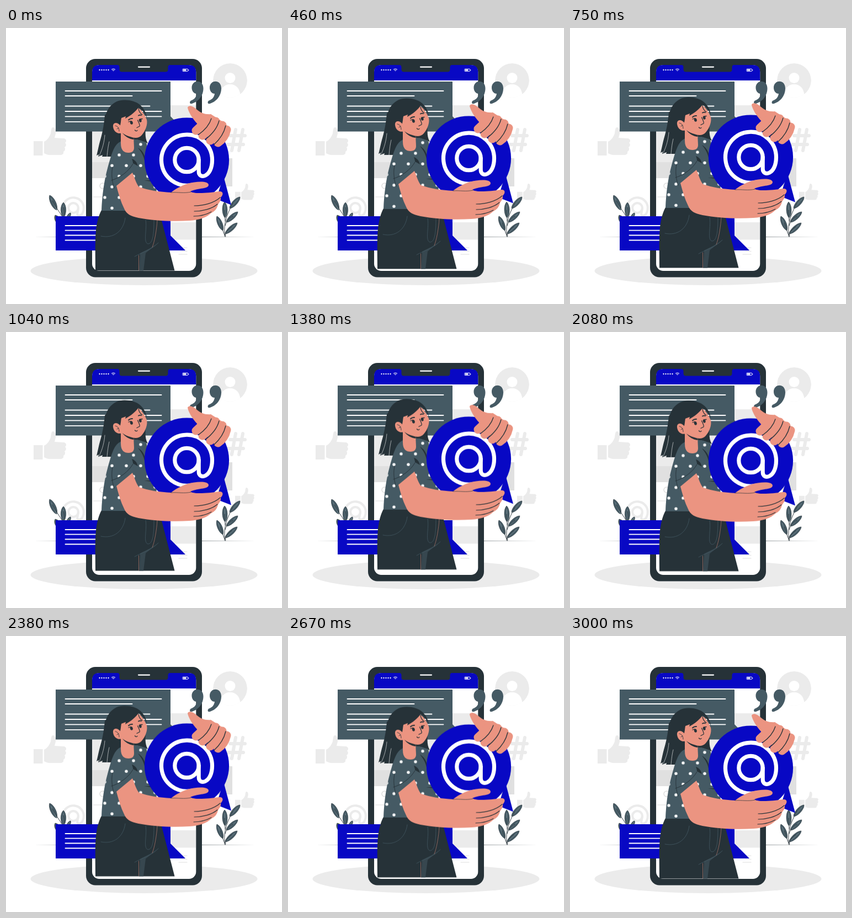
Recreate the animation shown at these times as an HTML page. Size 500 px wide and 500 px high, loop 3040 ms.

```html
<!DOCTYPE html>
<html lang="en">
<head>
<meta charset="utf-8">
<title>Mention</title>
<style>
  html, body { margin: 0; width: 100%; height: 100%; overflow: hidden; background: #fff; }
  svg { display: block; width: 100%; height: 100%; }
  .dark { fill: #263238; }
  .slate { fill: #455a64; }
  .blue { fill: #0808c4; }
  .pale { fill: #ebebeb; }
  .skin { fill: #eb9481; }
  .white { fill: #fff; }
  .line { fill: none; stroke-linecap: round; stroke-linejoin: round; }
  .ink { stroke: #263238; }
</style>
</head>
<body>
<svg viewBox="0 0 500 500">
  <defs>
    <pattern id="dots" x="198.5" y="220.4" width="26" height="38.5" patternUnits="userSpaceOnUse">
      <circle class="white" cx="6.5" cy="9.6" r="2.7"/>
      <circle class="white" cx="19.5" cy="28.9" r="2.7"/>
    </pattern>
    <clipPath id="avatar"><circle cx="406" cy="95" r="31"/></clipPath>
    <path id="quote" d="M347 96.800C353.500 96.800 357.500 102 357.500 109.500C357.500 123 348 134.500 335.500 137.300C332.500 137.300 332.300 133.300 335 131.500C341 129.500 344.500 125.500 345.500 119C340 119 336.500 114 336.500 108C336.500 101.500 341 96.800 347 96.800Z"/>
    <path id="thumb" d="M50 205H66.500V231H50ZM69 206C75 203 79 197 81 191C82 184 82 180 85 180C89 180 91 185 90 191L88 199L105 200C110 201 110 206 107 208C110 210 109 215 106 216C108 219 107 223 104 224C105 228 102 230 98 230H79C75 230 72 228 69 227Z"/>
    <g id="at" class="line">
      <circle r="21.700"/>
      <path d="M21.700 0V21C21.700 36 46 32 46 0A46 46 0 1 0 8 45.500"/>
    </g>
    <path id="shirt" d="M207 206C195 211 190 233 184 254C178 275 174 304 173 331H274L272 280L254 207L238 202Z"/>
  </defs>

  <!-- backdrop -->
  <ellipse class="pale" cx="250" cy="440" rx="205.500" ry="26"/>
  <path d="M50 378.500L250 378.100L452 378.500L250 378.900Z" class="dark"/>
  <g clip-path="url(#avatar)">
    <circle class="pale" cx="406" cy="95" r="31"/>
    <circle class="white" cx="406" cy="90.500" r="9.500"/>
    <path class="white" d="M387 128C387 110 395 102 406 102S425 110 425 128Z"/>
  </g>
  <use href="#thumb" class="pale"/>
  <use href="#thumb" class="pale" transform="translate(385.500 175.800) scale(.59)"/>
  <path class="line" stroke="#ebebeb" stroke-width="6" d="M416 184L409 222M429 184L422 222M406 195H433M402 211H430"/>
  <use href="#at" stroke="#ebebeb" stroke-width="10" transform="translate(122 326) rotate(10) scale(.41)"/>
  <path fill="#e0e0e0" d="M350 236H410V287H350Z"/>

  <!-- plants -->
  <g id="leaves"></g>
  <path class="line ink" stroke-width=".9" d="M84 313C90 325 97 333 104 345M104 325C106 334 105 339 104 345M397 378C394 362 396 344 411 318M396 330C396 340 397 346 397 350M388 353C391 362 394 370 397 378M411 341C403 346 399 351 397 358M409 360C402 365 398 370 397 377"/>

  <!-- phone -->
  <rect class="dark" x="145" y="56" width="210" height="395.500" rx="17"/>
  <rect class="white" x="156" y="67" width="188.300" height="373" rx="13"/>
  <path class="blue" d="M156 95V80Q156 67 169 67H331Q344.300 67 344.300 80V95Z"/>
  <path class="dark" d="M202 66.500Q205.500 67.500 205.500 71V75Q205.500 79.500 210 79.500H289Q293.500 79.500 293.500 75V71Q293.500 67.500 297 66.500Z"/>
  <path class="line" stroke="#fff" stroke-width="2.200" d="M240 70.600H260"/>
  <path class="line" stroke="#fff" stroke-width="2.300" d="M169.500 76h0M173.500 76h0M177.500 76h0M181.500 76h0M185.500 76h0"/>
  <path class="line" stroke="#fff" stroke-width="1" d="M191.300 75Q194.500 72.400 197.700 75M192.900 76.600Q194.500 75.300 196.100 76.600M194.500 78h0"/>
  <rect x="320" y="74" width="9.600" height="4.600" rx="1" fill="none" stroke="#fff" stroke-width=".9"/>
  <path class="white" d="M321 75H326.500V77.600H321ZM330.300 75.400H331.300V77.300H330.300Z"/>

  <!-- feed -->
  <path class="pale" d="M156 187H298V243H156ZM298 140H344V237H298ZM298 352H344V383.500H298Z"/>
  <path fill="#e0e0e0" d="M156 243H298V272H156Z"/>
  <path class="line" stroke="#e0e0e0" stroke-width="1.200" d="M313 398H328M318 404.500H328M313 410H328M158 306H178"/>
  <circle cx="175" cy="286" r="5" fill="none" stroke="#e0e0e0" stroke-width="1.600"/>

  <!-- messages -->
  <path class="slate" d="M90 97H298V160L325 187.500H90Z"/>
  <path class="line" stroke="#fff" stroke-width="1.800" d="M107.500 114H281.500M107.500 123H228.500M107.500 141.500H260.500M107.500 151H281.500M107.500 160.300H281.500M107.500 169.800H228.500"/>
  <path class="blue" d="M90 341H298V376L325 403H90Z"/>
  <path class="line" stroke="#fff" stroke-width="1.800" d="M107.500 358H200M107.500 366.700H200M107.500 375.500H200M107.500 384.500H200"/>
  <use href="#quote" class="slate"/>
  <use href="#quote" class="slate" x="32.500"/>

  <g id="floater">
    <!-- hair behind -->
    <path class="dark" d="M179 158C177 180 174 192 170 206C167 217 166 225 164 231L168 229L167 233L175 230L174 233H195C199 222 201 213 211 202L240 203L257 209C250 198 254 186 252 170L232 140L200 138Z"/>
    <path class="line" stroke="#fff" stroke-width=".6" d="M169 231C175 219 178 206 179 194M183 233C184 222 185 214 187 206"/>

    <!-- trousers -->
    <path class="dark" d="M173 330H272L281 345L305.500 439.500H162C162 415 161 388 163 366C165 350 168 339 173 330Z"/>
    <path fill="#37474f" d="M241 439.500L243 408C255 402 264 398 275 389C266 398 258 403 253 408L249 439.500Z"/>
    <path class="line" stroke="#455a64" stroke-width=".8" d="M172 377C195 382 213 368 216 344M253 348C256 364 248 388 257 391C266 391 268 374 268 347M233 414C245 407 264 402 276 389"/>
    <path class="line" stroke="#eb9481" stroke-width=".5" d="M274 348C273 366 269 388 265 397M240.500 412V439"/>

    <!-- top -->
    <use href="#shirt" class="slate"/>
    <use href="#shirt" fill="url(#dots)"/>
    <path class="dark" d="M239 217C246 221 250 227 252 235L251 240C249 230 244 223 239 217ZM228 237C234 239 237 243 239 250L230 245C230 242 229 240 228 237ZM250 276H268L269 279Z"/>
    <path class="slate" d="M191 276C207 270 222 260 230 247L232 262L199 286Z"/>
    <path class="line ink" stroke-width=".9" d="M193 252C191 262 191 275 196 290M191 276C207 271 222 260 230 246"/>

    <!-- head -->
    <path class="skin" d="M208 187L208 209C208 222 214 226 222 226C229 226 232 222 232 217L231 194Z"/>
    <path class="dark" d="M211 190C216 197 223 201 231 202V197Z"/>
    <path class="skin" d="M205 160L238 144C246 148 251 157 255 166C257 174 253 186 246 194C241 200 233 200 225 197C214 194 207 188 205 180Z"/>
    <path class="dark" d="M179 174C178 146 195 130.500 214 130.500C237 130 252 142 255.500 163C252 155 247 148 240 144C234 152 227 158 216 164L217 160L209 163C208 168 208 172 207 176L199 190L193 199Z"/>
    <path class="skin" d="M208 178C202 169 193 171 194 179C195 188 203 193 210 190Z"/>
    <path class="line ink" stroke-width=".9" d="M198 177C203 178 205 182 205 187M201 183L204 181"/>
    <path class="line ink" stroke-width="1.100" d="M240 145C240 150 243 155 247 157"/>
    <ellipse class="dark" cx="227.300" cy="171.500" rx="2.500" ry="3.300" transform="rotate(-12 227.300 171.500)"/>
    <ellipse class="dark" cx="243.200" cy="167.500" rx="2.400" ry="3.200" transform="rotate(-12 243.200 167.500)"/>
    <path class="line ink" stroke-width="1.300" d="M222 170L226 168.500M244 165L247 164.500M238.500 167C241 172 243 177 242 178L237 180.500M233.500 185C235 187 237 187 238 185.500"/>
    <path class="line ink" stroke-width="1.900" d="M222 166.500Q225 163.500 229 164M240 158.500Q243 157 245 158"/>

    <!-- badge -->
    <path class="blue" d="M394 268L408 320.500L381 310Z"/>
    <circle class="blue" cx="327.500" cy="239" r="76.600"/>
    <use href="#at" stroke="#fff" stroke-width="7.200" transform="translate(327.500 239)"/>

    <!-- near arm -->
    <path class="skin" d="M200 286L229 262C233 270 235 281 241 288C258 294 279 297 299 298C306 292 317 286 329 282C343 278 366 276 367 284C367 292 350 289 334 296C340 301 365 299 386 296C393 295 395 301 389 307C390 313 386 316 384 320C382 328 378 332 372 335C364 343 350 348 332 349C301 351 267 349 240 344C226 341 218 337 214 327C208 315 204 301 200 286Z"/>
    <path class="line ink" stroke-width="1.100" d="M341 322C356 322 376 318 388 307M341 332C355 332 373 328 383 319M340 341C352 341 363 338 372 333"/>
    <path class="line ink" stroke-width=".7" d="M299 298C312 297 322 300 335 297"/>

    <!-- far hand -->
    <path class="skin" d="M329 144C331 139 339 141 346 148C353 154 361 157 371 156L396 172L379 200L354 194L346 173C337 163 330 151 329 144Z"/>
    <path class="line" stroke="#eb9481" stroke-width="15" d="M366 164C360 171 352 179 344 186M380 169C374 179 365 188 356 195M392 176C387 187 380 197 370 204M400 184C398 193 393 202 384 208"/>
    <path class="line ink" stroke-width="1.300" d="M372 164C369 174 360 185 349 193M386 168C383 180 374 192 361 202M398 177C395 190 388 201 377 211"/>
  </g>
</svg>
<script>
  const LOOP = 3040, FLOAT = 3000, RISE = 10;

  // base x, base y, tip x, tip y, half width
  const leaves = [
    [92, 330, 79, 303, 4.6], [104, 343, 104, 316, 4.6], [98, 356, 89, 339, 4.5], [111, 345, 117, 335, 2.5],
    [405, 327, 424, 306, 4.2], [397, 344, 396, 315, 4.4], [399, 352, 420, 333, 4],
    [393, 367, 382, 341, 4.2], [397, 373, 419, 353, 4]
  ];
  const leafPath = ([x, y, u, v, w]) => {
    const len = Math.hypot(u - x, v - y);
    const nx = (y - v) / len * w * 1.35, ny = (u - x) / len * w * 1.35;
    const at = (k, side) =>
      `${x + (u - x) * k + nx * side} ${y + (v - y) * k + ny * side}`;
    return `M${x} ${y}C${at(.2, 1)} ${at(.8, 1)} ${u} ${v}C${at(.8, -1)} ${at(.2, -1)} ${x} ${y}Z`;
  };
  document.getElementById('leaves').innerHTML = leaves.map(leaf => {
    const [x, y, u, v] = leaf;
    return `<path class="slate" stroke="#263238" stroke-width=".6" d="${leafPath(leaf)}"/>` +
      `<path stroke="#b0bec5" stroke-width=".5" d="M${x} ${y}L${x + (u - x) * .8} ${y + (v - y) * .8}"/>`;
  }).join('');

  const shift = y => ({ transform: `translateY(${y}px)` });
  document.getElementById('floater').animate([
    { ...shift(0), offset: 0 },
    { ...shift(-RISE), offset: FLOAT / 2 / LOOP },
    { ...shift(0), offset: FLOAT / LOOP },
    { ...shift(0), offset: 1 }
  ], { duration: LOOP, iterations: Infinity });
</script>
</body>
</html>
```
